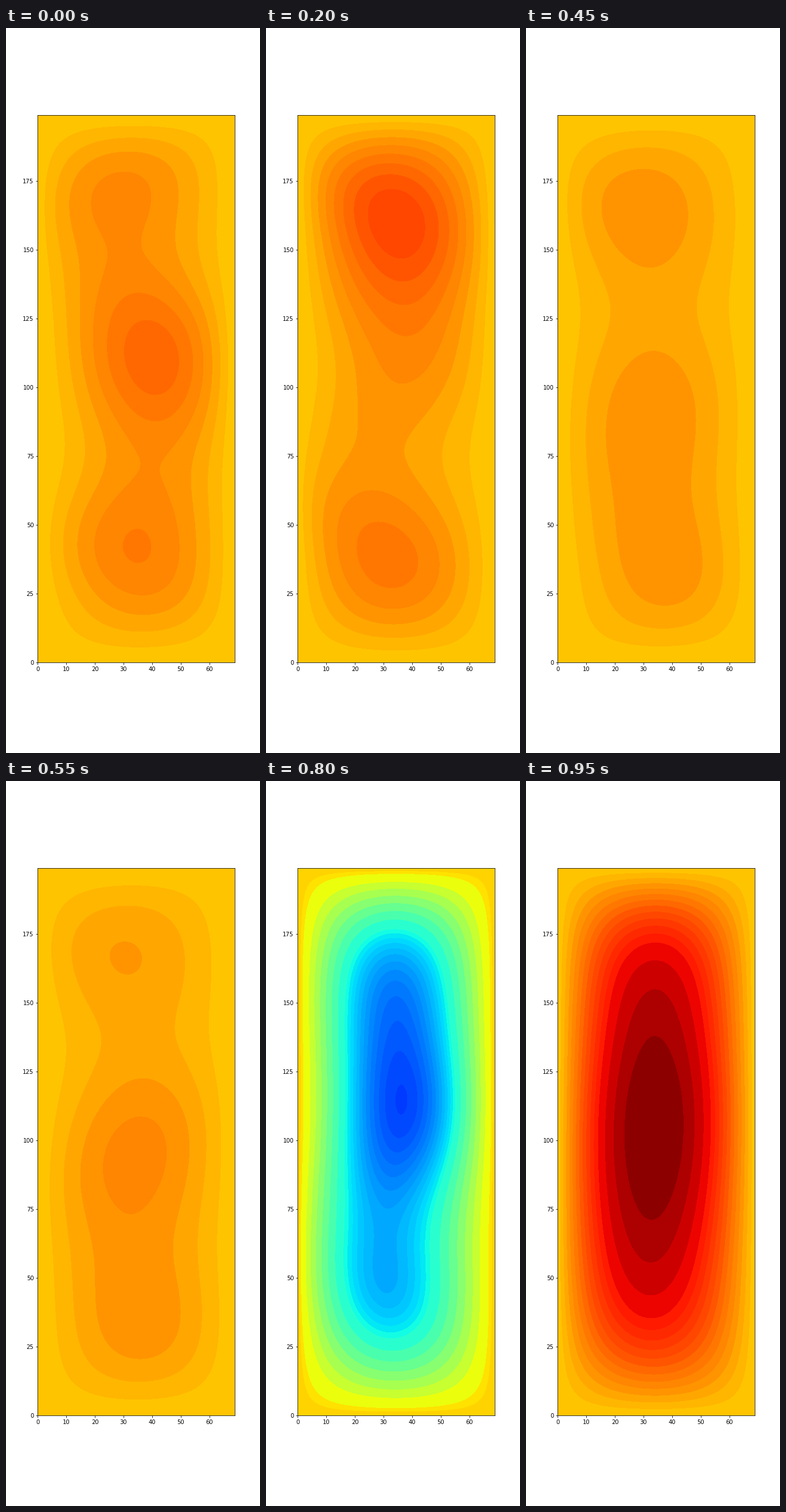
These frames come from a looping animation (443 by 1265 pixels, 1000 ms). A matplotlib script:

```python
import numpy as np
import matplotlib.pyplot as plt
from matplotlib.animation import FuncAnimation

W, H, DPI = 443, 1265, 72
NX, NY = 70, 200
FRAMES, STEP_MS = 20, 50
REST = 0.693  # colour position of the fixed rim
STEP = 0.0165  # one warm band on the jet scale

# Band edges: even in green and blue, wider where red changes
blues = 0.379 - 0.0157 * np.arange(16, 0, -1)
greens = 0.379 + 0.039 * np.arange(7)
warms = REST + STEP * np.arange(-2, 13)
reds = 0.917 + 0.028 * np.arange(3)
EDGES = np.concatenate([[-0.2], blues, greens, warms, reds, [1.2]])
MIDS = np.clip((EDGES[:-1] + EDGES[1:]) / 2, 0.11, 0.9865)
COLORS = plt.get_cmap("jet")(MIDS)

X = np.linspace(0, 1, NX)
Y = np.linspace(0, 1, NY)
GRID_X, GRID_Y = np.meshgrid(np.arange(NX), np.arange(NY))


def sine_curve(values):
    """Smooth curve along Y through evenly spaced values, zero at both ends."""
    n = len(values) + 1
    k = np.arange(1, n)
    coef = 2 / n * np.sin(np.pi * np.outer(k, k) / n) @ values
    return np.sin(np.pi * np.outer(Y, k)) @ coef


def membrane(heights, leans):
    """Arch across each row, with its crest moved sideways by the lean."""
    crest = 0.5 + sine_curve(leans) / (NX - 1)
    power = np.log(0.5) / np.log(crest)
    arch = np.sin(np.pi * X[None, :] ** power[:, None])
    return STEP * sine_curve(heights)[:, None] * arch


# Crest heights in bands and leans in x units, from bottom to top
KEYS = {
    0: membrane([4.05, 4.95, 4.1, 6.2, 6.0, 4.15, 4.3], [2, 0.5, 5.5, 6.5, 3.5, -4, -5]),
    4: membrane([4.75, 5.1, 3.3, 3.9, 5.45, 8.25, 7.65], [-1.5, -6, -7.5, 1.5, 3, 1.5, -2]),
    7: membrane([3.4, 4.0, 3.2, 3.35, 4.1, 6.15, 6.4], [-4, 3, -3]),
    9: membrane([3.35, 3.75, 3.8, 3.65, 2.6, 3.3, 3.45], [3, 0, -2.5, -1.5, -1, -3, -5]),
    13: membrane([3.4, 3.75, 4.3, 5.25, 3.2, 1.95, 2.4], [-0.5, -0.5, -1.5, 1.5, 4.5, 1.5, -3]),
    16: membrane([-17.5, -24.2, -24.7, -29.3, -30.2, -28, -20.7],
                 [-1.5, -3.7, -3, 0.8, 1.5, 0, -0.5]),
    19: membrane([9.3, 14.5, 17.3, 18.9, 18.1, 15.9, 11.3], [-2, -1, -0.5]),
}
TIMES = list(KEYS)


def surface(frame):
    end = next(t for t in TIMES if t >= frame)
    start = max([t for t in TIMES if t < frame], default=end)
    mix = (frame - start) / max(end - start, 1)
    z = (1 - mix) * KEYS[start] + mix * KEYS[end]
    # keep the rim on one side of its band edge
    z = np.maximum(z, 1e-4) if z.mean() > 0 else np.minimum(z, -1e-4)
    return REST + z


fig = plt.figure(figsize=((W + 1e-6) / DPI, (H + 1e-6) / DPI), dpi=DPI,
                 facecolor="white")
fig.subplots_adjust(left=55.48 / W, right=399.4 / W, bottom=0.125, top=0.88)
ax = fig.add_subplot()
bands = None


def draw(frame):
    global bands
    if bands is not None:
        bands.remove()
    bands = ax.contourf(GRID_X, GRID_Y, surface(frame), levels=EDGES, colors=COLORS)
    ax.set(xlim=(0, NX - 1), ylim=(0, NY - 1),
           xticks=range(0, 61, 10), yticks=range(0, 176, 25))
    return [bands]


anim = FuncAnimation(fig, draw, frames=FRAMES, interval=STEP_MS,
                     init_func=lambda: draw(0), repeat=True, repeat_delay=0)
plt.show()
```
